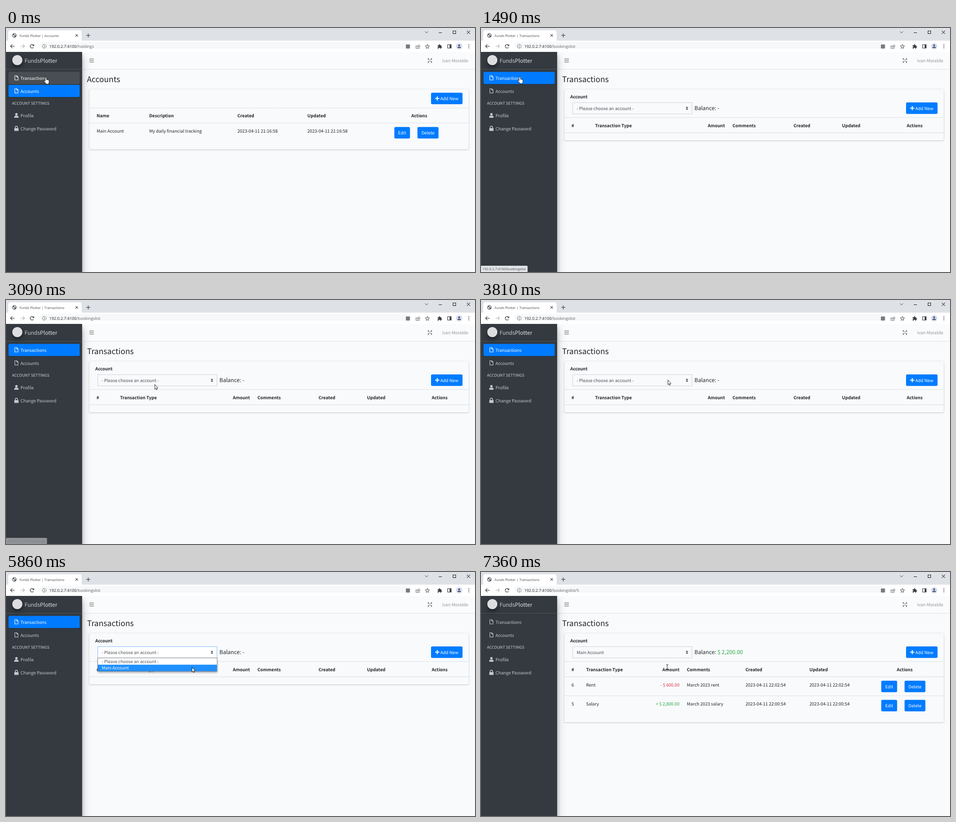
Recreate the animation shown at these times as an HTML page with a canvas. Size 1035 by 541 pixels, loop 8 s.

```html
<!DOCTYPE html>
<html lang="en">
<head>
<meta charset="utf-8">
<title>Funds Plotter</title>
<style>
html, body { margin: 0; width: 100%; height: 100%; overflow: hidden; background: #f8fafc; }
canvas { display: block; width: 1035px; height: 541px; }
</style>
</head>
<body>
<canvas id="stage"></canvas>
<script>
const W = 1035, H = 541, LOOP = 8000;
const canvas = document.getElementById('stage');
const g = canvas.getContext('2d');
const dpr = window.devicePixelRatio || 1;
canvas.width = W * dpr;
canvas.height = H * dpr;

const UI = '"Noto Sans CJK JP", "Noto Sans CJK SC", "Noto Sans CJK", "Noto Sans", sans-serif';
const CHROME = '"Open Sans", "Noto Sans", sans-serif';
const BLUE = '#007bff', INK = '#212529', BG = '#f8fafc', LINE = '#dee2e6', BODY = 10.75;
const HOST = '192.0.2.7:4100', APP = 'Funds Plotter';
const BOOK = '/bookingslist', HOLD = '/holdings';

// Pointer hot spot: [time, x, y], held until the next entry
const MOVES = [
  [0, 88, 109], [90, 85.5, 108],
  [2430, 93, 113], [2510, 110, 127], [2590, 126, 140], [2660, 140, 150],
  [2750, 184, 166], [2830, 236, 177], [2920, 286, 184], [3000, 320, 187], [3090, 328, 187],
  [3270, 334, 186], [3360, 348, 184], [3450, 366, 182], [3540, 385, 180],
  [3630, 399, 178], [3720, 408, 177], [3810, 412, 177],
  [5350, 412, 179], [5430, 412, 184], [5520, 411, 191], [5600, 411, 198],
  [5690, 410, 205], [5780, 410, 209], [5860, 410, 211],
  [6360, 411, 211]
];

function rect(x, y, w, h, fill, r = 0) {
  g.beginPath();
  g.roundRect(x, y, w, h, r);
  g.fillStyle = fill;
  g.fill();
}

function line(color, width, ...pts) {
  g.beginPath();
  for (let i = 0; i < pts.length; i += 2) g.lineTo(pts[i], pts[i + 1]);
  g.strokeStyle = color;
  g.lineWidth = width;
  g.stroke();
}

function disc(x, y, r, fill) {
  g.beginPath();
  g.arc(x, y, r, 0, 7);
  g.fillStyle = fill;
  g.fill();
}

function ring(x, y, r, color, width, from = 0, to = Math.PI * 2) {
  g.beginPath();
  g.arc(x, y, r, from, to);
  g.strokeStyle = color;
  g.lineWidth = width;
  g.stroke();
}

// Path given relative to (x, y)
function shape(x, y, d, fill, stroke, width = 1) {
  g.save();
  g.translate(x, y);
  const p = new Path2D(d);
  if (fill) { g.fillStyle = fill; g.fill(p); }
  if (stroke) { g.strokeStyle = stroke; g.lineWidth = width; g.stroke(p); }
  g.restore();
}

function shadow(color, blur, dy, draw) {
  g.save();
  g.shadowColor = color;
  g.shadowBlur = blur * dpr;
  g.shadowOffsetY = dy * dpr;
  draw();
  g.restore();
}

function write(s, x, y, font, color, align) {
  g.font = font;
  g.fillStyle = color;
  g.textAlign = align;
  g.fillText(s, x, y);
  return g.measureText(s).width;
}

// The CJK family has larger Latin letters, hence the ratio
const text = (s, x, y, { size = BODY, color = INK, weight = 400, align = 'left' } = {}) =>
  write(s, x, y, `${weight} ${size / 1.117}px ${UI}`, color, align);
const bold = (s, x, y, align) => text(s, x, y, { weight: 700, align });
const label = (s, x, y, size, color) => write(s, x, y, `${size}px ${CHROME}`, color, 'left');

function stateAt(t) {
  const s = { t };
  const [, x, y] = MOVES.findLast(m => m[0] <= t);
  s.x = x;
  s.y = y;
  s.page = t < 1410 ? 'accounts' : t < 7280 ? 'empty' : 'list';
  s.loading = (t >= 730 && t < 1490) || (t >= 6540 && t < 7360);
  s.waiting = (t >= 730 && t < 1350) || (t >= 6540 && t < 7140);
  s.path = t < 730 ? HOLD : t < 6540 ? BOOK : BOOK + '/5';
  s.title = s.waiting ? HOST + s.path : APP + (t < 730 ? ' | Accounts' : ' | Transactions');
  s.open = t >= 4640 && t < 6540;
  s.focus = t >= 4640 && t < 7280;
  s.chosen = t >= 6540;
  s.hover = x > 163 ? '' : y < 125 ? 'Transactions' : y > 126 ? 'Accounts' : '';
  s.cursor = t >= 6540 ? 'beam' : x > 163 || (t >= 730 && t < 1410) ? 'arrow' : 'hand';
  return s;
}

function browser(s) {
  const dark = '#3c4043';
  rect(0, 0, W, 28, '#dee1e6');
  rect(0, 28, W, 25, '#fff');
  rect(5, 5, 162, 24, '#fff', [5, 5, 0, 0]);
  if (s.loading) {
    const step = Math.floor(s.t / 80);
    if (s.waiting) ring(18.5, 16.5, 4.6, '#a9c1ef', 1.1, 3.2 - (step - 15) * 0.5, 5.3 - (step - 15) * 0.5);
    else ring(18.5, 16.5, 4.6, '#4285d8', 1.2, -1.7 + (step - 90) * 0.7, 1.7 + (step - 90) * 0.7);
  } else {
    disc(18.5, 16.5, 4.8, '#5f6368');
    shape(18.5, 16.5, 'M-3.6-1Q-1-1 0 .6Q1 2 -1 3.6Q-3.5 2-3.6-1ZM0-3.8Q3-3 3.6-.2Q1 .3 .6-1Q-1-2 0-3.8Z', '#fff');
  }
  label(s.title, 30, 19.5, 7.5, '#45494d');
  const cross = (x, y, r) => {
    line(dark, 1.1, x - r, y - r, x + r, y + r);
    line(dark, 1.1, x + r, y - r, x - r, y + r);
  };
  cross(156, 16.5, 2.6);
  line(dark, 1.2, 177, 16.5, 186, 16.5);
  line(dark, 1.2, 181.5, 12, 181.5, 21);
  line(dark, 1, 924.5, 7.5, 928, 11, 931.5, 7.5);
  line('#111', 1, 955, 10.5, 962, 10.5);
  g.strokeRect(986.5, 6.5, 6, 6);
  cross(1020.5, 9.5, 3.6);

  const arrow = (x, d, color) => {
    line(color, 1.2, x - 4.5 * d, 40.5, x + 4.5 * d, 40.5);
    line(color, 1.2, x + d * .5, 36.5, x + 4.5 * d, 40.5, x + d * .5, 44.5);
  };
  arrow(14.5, -1, dark);
  arrow(36.5, 1, '#b4b7ba');
  if (s.loading) cross(58, 40.5, 3.8);
  else {
    ring(57.5, 40.5, 4, dark, 1.3, 0.6, 5.4);
    shape(57.5, 40.5, 'M4.6-4.8V-.6H.5Z', dark);
  }

  rect(74, 31, 818, 15, '#f6f8f9', 7);
  ring(84.5, 40.5, 4.1, '#5f6368', 0.9);
  line('#5f6368', 1, 84.5, 39.8, 84.5, 43);
  line('#5f6368', 1, 84.5, 38, 84.5, 39);
  const w = label(HOST, 95.5, 44, 8.85, '#202124');
  label(s.path, 95.5 + w, 44, 8.85, '#5f6368');

  if (!s.loading) rect(882.5, 36.5, 9, 9, '#777b80', 1);
  shape(909, 41, 'M-2-1.5H-4.3V4.3H3V2M-2 2Q-1.5-2 2-2V-4L5-1L2 1.8V0Q-.5 0-2 2Z', null, '#5f6368', 1);
  shape(930, 41, 'M0-4.6L1.3-1.5L4.6-1.2L2.1 1L2.9 4.2L0 2.5L-2.9 4.2L-2.1 1L-4.6-1.2L-1.3-1.5Z', null, dark, 1);
  shape(957, 41, 'M-4.5-2.8H-1.5Q-2-5-.2-5Q1.7-5 1.2-2.8H3.6V0Q5.4-.5 5.4 1Q5.4 2.5 3.6 2V4.6H1Q1.2 2.7-.4 2.7Q-2 2.7-1.8 4.6H-4.5V1.8Q-2.6 2-2.6 .8Q-2.6-.6-4.5-.3Z', dark);
  g.lineWidth = 1.2;
  g.strokeStyle = dark;
  g.strokeRect(974.5, 37, 8, 7.5);
  rect(979, 37, 4, 7.5, dark);
  disc(1000, 40.5, 7, '#d5dced');
  disc(1000, 38.5, 2, '#3d4868');
  shape(1000, 40.5, 'M-4 3.8Q-3.6 1 0 1Q3.6 1 4 3.8Z', '#3d4868');
  for (const y of [37, 40.5, 44]) disc(1021.5, y, 1, dark);
}

function navbar() {
  rect(168, 53, W - 168, 38, '#fafbfc');
  line(LINE, 1, 168, 91.5, W, 91.5);
  for (const y of [68.5, 72, 75.5]) line('#6c7075', 1.2, 184, y, 194, y);
  for (const a of [-1, 1]) for (const b of [-1, 1]) {
    line('#6c7075', 1.2, 935.5 + a, 72 + b, 935.5 + a * 4, 72 + b * 4);
    shape(935.5, 72, `M${a * 4.7} ${b * 4.7}H${a * 1.6}L${a * 4.7} ${b * 1.6}Z`, '#6c7075');
  }
  text('Ivan Morelde', 1020, 76, { color: '#93979b', align: 'right' });
}

function sidebar(s) {
  g.save();
  g.beginPath();
  g.rect(0, 53, W, H);
  g.clip();
  const panel = () => rect(0, 53, 168, 520, '#343a40');
  shadow('rgba(0,0,0,.25)', 19, 9.4, panel);
  shadow('rgba(0,0,0,.22)', 6.7, 6.7, panel);
  line('#4b545c', 1, 0, 91.5, 168, 91.5);
  const badge = () => disc(25, 71.3, 11, '#dcdddf');
  shadow('rgba(0,0,0,.25)', 13, 6.7, badge);
  shadow('rgba(0,0,0,.23)', 4, 4, badge);
  g.restore();
  const w = text('Funds', 41, 76.7, { size: 13.44, color: '#c9cbcd', weight: 300 });
  text('Plotter', 41 + w, 76.7, { size: 13.44, color: '#e3e4e5' });

  const active = { accounts: 'Accounts', empty: 'Transactions' }[s.page];
  const item = (name, y) => {
    const on = name === active, over = name === s.hover;
    if (on) shadow('rgba(0,0,0,.3)', 2, 0.7, () => rect(5.4, y - 13.8, 157.3, 27, BLUE, 2.7));
    else if (over) rect(5.4, y - 13.8, 157.3, 27, '#494e54', 2.7);
    const color = on || over ? '#fff' : '#c2c7d0';
    text(name, 32, y + 3.7, { color });
    return color;
  };
  for (const [name, y] of [['Transactions', 111], ['Accounts', 139.8]]) {
    const color = item(name, y);
    shape(23, y - .5, 'M-3.5-4.8H.8L3.6-2V4.8H-3.5ZM.6-4.6V-1.7H3.5', null, color, 1.1);
  }
  text('ACCOUNT SETTINGS', 13.3, 170.3, { size: 9.68, color: '#d0d4db' });
  let color = item('Profile', 194.5);
  disc(23, 191.3, 2.7, color);
  shape(23, 194, 'M-4.7 5V3Q-4.7.6-2.4.6H2.4Q4.7.6 4.7 3V5Z', color);
  color = item('Change Password', 223.3);
  rect(18.3, 222, 9.4, 6.2, color, 1);
  shape(23, 222, 'M-2.6 .5V-1.8Q-2.6-4.2 0-4.2Q2.6-4.2 2.6-1.8V.5', null, color, 1.5);
}

function card(bottom, split, head) {
  const body = () => rect(183.5, 135.5, 838, bottom - 135.5, BG, 2.7);
  shadow('rgba(0,0,0,.125)', 1, 0, body);
  shadow('rgba(0,0,0,.25)', 2.2, 0.7, body);
  line(LINE, 1, 183.5, split, 1021.5, split);
  line(LINE, 1.2, 183.5, head, 1021.5, head);
}

function button(s, x, y, w) {
  rect(x, y, w, 25.5, BLUE, 2.7);
  text(s, x + w / 2, y + 16.6, { color: '#fff', align: 'center' });
}

function addNew(y) {
  rect(938, y, 69.5, 25.5, BLUE, 2.7);
  line('#fff', 2, 947, y + 12.7, 956.4, y + 12.7);
  line('#fff', 2, 951.7, y + 8, 951.7, y + 17.4);
  text('Add New', 958.5, y + 16.6, { color: '#fff' });
}

function accounts() {
  text('Accounts', 178.5, 120, { size: 19.35 });
  card(269.5, 177.5, 210.5);
  addNew(143.5);
  const when = '2023-04-11 21:16:58';
  [['Name', 'Main Account', 200], ['Description', 'My daily financial tracking', 316],
   ['Created', when, 510.7], ['Updated', when, 665]].forEach(([head, cell, x]) => {
    bold(head, x, 198.2);
    text(cell, x, 232);
  });
  bold('Actions', 912, 198.2, 'center');
  button('Edit', 857, 219.5, 34.5);
  button('Delete', 908, 219.5, 46.5);
}

function picker(s) {
  rect(202.5, 165.5, 263, 25, s.open ? '#fff' : BG);
  g.strokeStyle = s.focus ? (s.t < 4730 ? '#a7c9ea' : '#80bdff') : '#ced4da';
  g.lineWidth = 1;
  g.strokeRect(202.5, 165.5, 263, 25);
  text(s.chosen ? 'Main Account' : '- Please choose an account -', 211, 181.7, { color: '#495057' });
  shape(454.5, 178, 'M-2.7-.8L0-3.7L2.7-.8ZM-2.7.8L0 3.7L2.7.8Z', '#343a40');
}

function popup(s) {
  g.save();
  if (s.t < 4730) g.globalAlpha = 0.6;
  shadow('rgba(0,0,0,.35)', 4, 2, () => rect(202.5, 190.5, 263.5, 30, '#fff'));
  const second = s.y >= 205;
  rect(203, second ? 205.5 : 191, 262.5, 14.5, '#1e90ff');
  g.strokeStyle = '#767f88';
  g.lineWidth = 1;
  g.strokeRect(202.5, 190.5, 263.5, 29.8);
  text('- Please choose an account -', 211, 202, { color: second ? '#495057' : '#fff' });
  text('Main Account', 211, 216.2, { color: second ? '#fff' : '#495057' });
  g.restore();
}

function transactions(s) {
  const full = s.page === 'list';
  text('Transactions', 179, 120, { size: 19.35 });
  card(full ? 333.5 : 249.5, 198.5, 232.3);
  bold('Account', 197, 155.7);
  picker(s);
  const w = text(full ? 'Balance: ' : 'Balance: -', 471, 182, { size: 13.44 });
  if (full) text('$ 2,200.00', 471 + w, 182, { size: 13.44, color: '#28a745' });
  addNew(165);

  const cols = full ? [232, 438, 454.3, 583.7, 724.7, 935] : [251.8, 538.3, 555, 689.7, 796.5, 957];
  bold('#', 199.7, 219.7);
  ['Transaction Type', 'Amount', 'Comments', 'Created', 'Updated', 'Actions'].forEach((name, i) =>
    bold(name, cols[i], 219.7, i === 1 ? 'right' : i === 5 ? 'center' : 'left'));
  if (!full) return;
  line(LINE, 1, 183.5, 274.5, 1021.5, 274.5);
  const row = (y, id, type, amount, color, note, when) => {
    text(id, 199.7, y);
    text(type, cols[0], y);
    text(amount, cols[1], y, { color, align: 'right' });
    text(note, cols[2], y);
    text(when, cols[3], y);
    text(when, cols[4], y);
    button('Edit', 883.3, y - 12.5, 35);
    button('Delete', 934.7, y - 12.5, 46);
  };
  row(253.5, '6', 'Rent', '- $ 600.00', '#dc3545', 'March 2023 rent', '2023-04-11 22:02:54');
  row(296, '5', 'Salary', '+ $ 2,800.00', '#28a745', 'March 2023 salary', '2023-04-11 22:00:54');
}

function bubble(t) {
  if (t < 270 || t >= 3180) return;
  const s = HOST + (t < 2590 ? BOOK : HOLD);
  g.save();
  g.globalAlpha = t < 420 ? Math.ceil((t - 269) / 75) / 3 : t < 2920 ? 1 : (3180 - t) / 260;
  g.font = `7.5px ${CHROME}`;
  const w = g.measureText(s).width + 7.5;
  rect(-3, 527, w + 3, 17, '#c8cbcf', [0, 2, 0, 0]);
  rect(-3, 528, w + 2, 16, '#e3e5e8', [0, 2, 0, 0]);
  label(s, 3.5, 537.3, 7.5, '#4a4e52');
  g.restore();
}

function pointer({ x, y, cursor }) {
  if (cursor === 'hand') {
    shape(x, y, 'M-1.4 1.5Q-1.4 0 0 0Q1.3 0 1.3 1.5V5.3L5.3 6.2Q7 6.6 7 8.3V10.6Q7 12.6 6 14V15.3H.2V14.2L-3.8 9.4Q-4.6 8-3.4 7.6Q-2.6 7.4-1.4 8.8Z', '#fff', '#111', 0.9);
  } else if (cursor === 'arrow') {
    shape(x, y, 'M.4.4V10.8L2.7 8.7L4.2 12.2L5.8 11.5L4.3 8.1H7.4Z', '#fff', '#111', 0.9);
  } else {
    shape(x, y, 'M-2.3-5.5H-.6L0-4.9L.6-5.5H2.3M0-5V5M-2.3 5.5H-.6L0 4.9L.6 5.5H2.3', null, '#222', 1);
  }
}

function frame(now) {
  const s = stateAt((now - start) % LOOP);
  g.setTransform(dpr, 0, 0, dpr, 0, 0);
  g.textRendering = 'geometricPrecision';
  rect(0, 0, W, H, BG);
  navbar();
  if (s.page === 'accounts') accounts();
  else transactions(s);
  sidebar(s);
  browser(s);
  if (s.open) popup(s);
  bubble(s.t);
  pointer(s);
  requestAnimationFrame(frame);
}

const start = performance.now();
frame(start);
</script>
</body>
</html>
```
